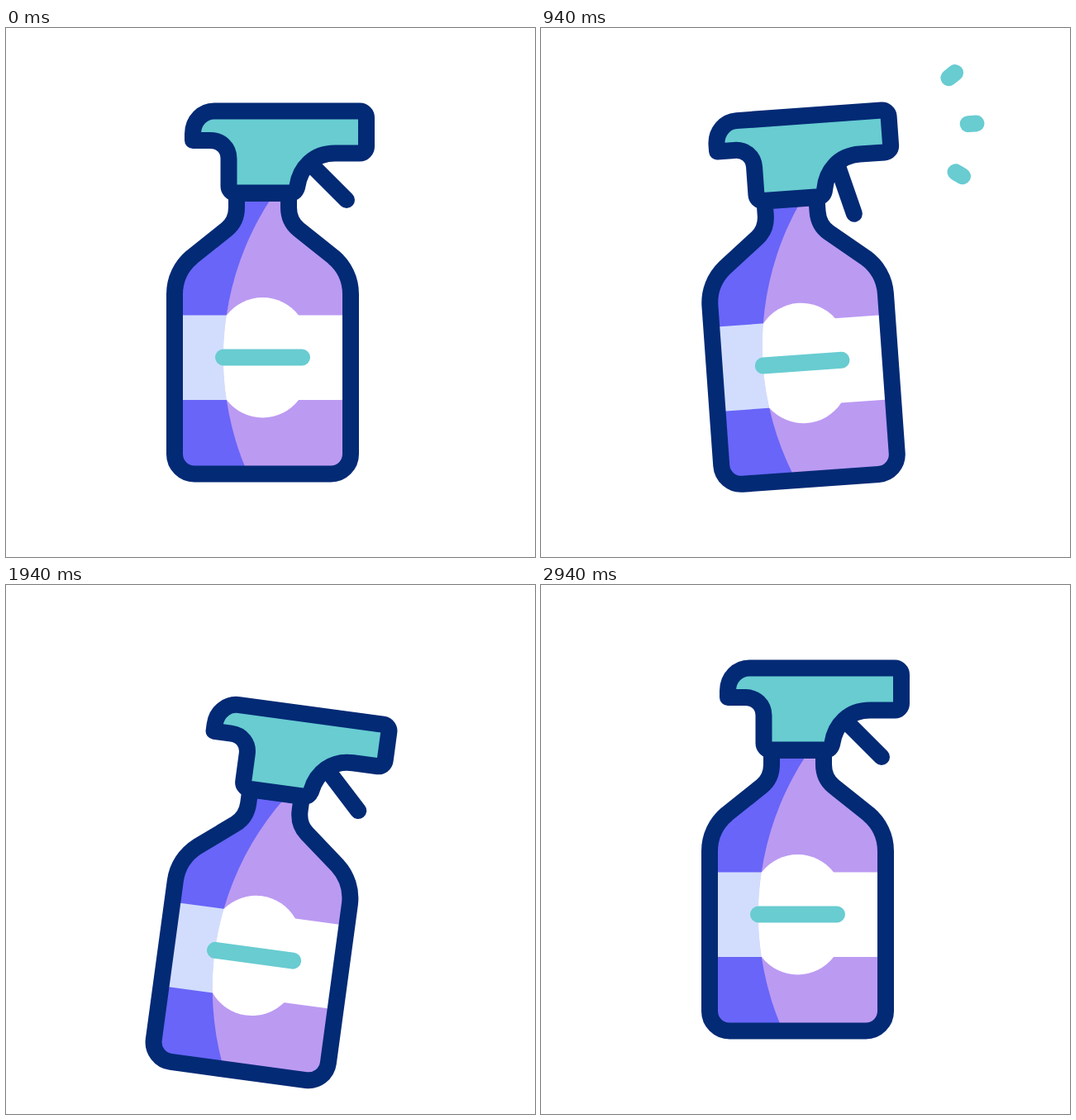
Animation of 640x640 px, one loop 2.98 s. Source, as an HTML page:

```html
<!DOCTYPE html>
<html lang="en">
<head>
<meta charset="utf-8">
<title>Spray bottle</title>
<style>
  html, body { margin: 0; width: 100%; height: 100%; overflow: hidden; background: #fff; }
  svg { display: block; width: 100vw; height: 100vh; }
  .ink { stroke: #032a75; }
  .teal { stroke: #68ccd1; }
</style>
</head>
<body>
<svg viewBox="0 0 640 640" fill="none" stroke-width="20" stroke-linecap="round" stroke-linejoin="round">
  <defs>
    <path id="body" d="M279 200V217C279 228 275 237 267 243.500L225 277C212 288 204 304 204 322V515.500A24 24 0 0 0 228 539.500H393A24 24 0 0 0 417 515.500V322C417 304 409 288 396 277L354 243.500C346 237 342 228 342 217V200Z"/>
    <path id="band" d="M204 347.500H417V450H204Z"/>
    <clipPath id="lit"><circle cx="612" cy="398.500" r="349"/></clipPath>
  </defs>
  <g id="bottle">
    <use href="#body" fill="#6865f8"/>
    <use href="#band" fill="#d2ddfd"/>
    <g clip-path="url(#lit)">
      <use href="#body" fill="#bb9af2"/>
      <use href="#band" fill="#fff"/>
    </g>
    <path d="M267 347.500A54.700 54.700 0 0 1 354 347.500V450A54.700 54.700 0 0 1 267 450Q259 398.500 267 347.500Z" fill="#fff"/>
    <path class="teal" d="M263 398.500H358"/>
    <use href="#body" class="ink"/>
    <path id="trigger" class="ink" d="M371 167L412 208"/>
    <path class="ink" fill="#68ccd1" d="M252 100.500H428A8 8 0 0 1 436 108.500V143.500A8 8 0 0 1 428 151.500H398C372 151.500 356 169 352.500 191Q351 199.500 344 199.500H277.500A8 8 0 0 1 269.500 191.500V158C269.500 145 260 136 247 136H226V128C226 112 238 100.500 252 100.500Z"/>
    <g id="spray" class="teal">
      <line transform="translate(520 61.500) rotate(-34.500)"/>
      <line transform="translate(541 124.500)"/>
      <line transform="translate(520 187) rotate(34.500)"/>
    </g>
  </g>
</svg>
<script>
const LOOP = 2980;
const START = 190, BEAT = 255, RISE = 1185, LAG = 40;
const PUMP = 460, PUMP_GAP = 650;
const $ = id => document.getElementById(id);

const clamp = x => Math.min(1, Math.max(0, x));
const smooth = x => { x = clamp(x); return x * x * (3 - 2 * x); };
const fade = (x, power) => (1 - clamp(x)) ** power;

// Swings through the stops: one beat down, a slow rise, then one beat each
function swing(t, stops, softness) {
  let i = 0, part = smooth(t / BEAT);
  if (t > BEAT + RISE) {
    const beats = (t - BEAT - RISE) / BEAT;
    i = Math.min(2 + Math.floor(beats), stops.length - 2);
    part = smooth(beats + 2 - i);
  } else if (t > BEAT) {
    i = 1;
    part = (1 - fade((t - BEAT) / RISE, 2.4)) ** softness;
  }
  return stops[i] + (stops[i + 1] - stops[i]) * part;
}

function draw(now) {
  const t = now % LOOP;
  const drop = swing(t - START, [0, 63, -15, 61, -14, 10, 0], 1);
  const tilt = swing(t - START - LAG, [0, 8, -12.4, 7.9, -8, 3.2, -1, 0], 1.4);
  $('bottle').setAttribute('transform', `translate(0 ${drop}) rotate(${tilt} 320 320)`);

  // Time since the latest of the two pumps
  const s = t - PUMP - (t < PUMP + PUMP_GAP ? 0 : PUMP_GAP);
  const pull = 30 * (smooth(s / 120) - smooth((s - 510) / 140));
  $('trigger').setAttribute('transform', `rotate(${pull} 371 167)`);

  $('spray').style.display = s > 60 && s < 610 ? '' : 'none';
  for (const line of $('spray').children) {
    line.setAttribute('x1', -60 * fade((s - 90) / 520, 1.3));
    line.setAttribute('x2', -60 * fade((s - 40) / 190, 2));
  }
}

const start = performance.now();
function tick() {
  draw(performance.now() - start);
  requestAnimationFrame(tick);
}
tick();
</script>
</body>
</html>
```
